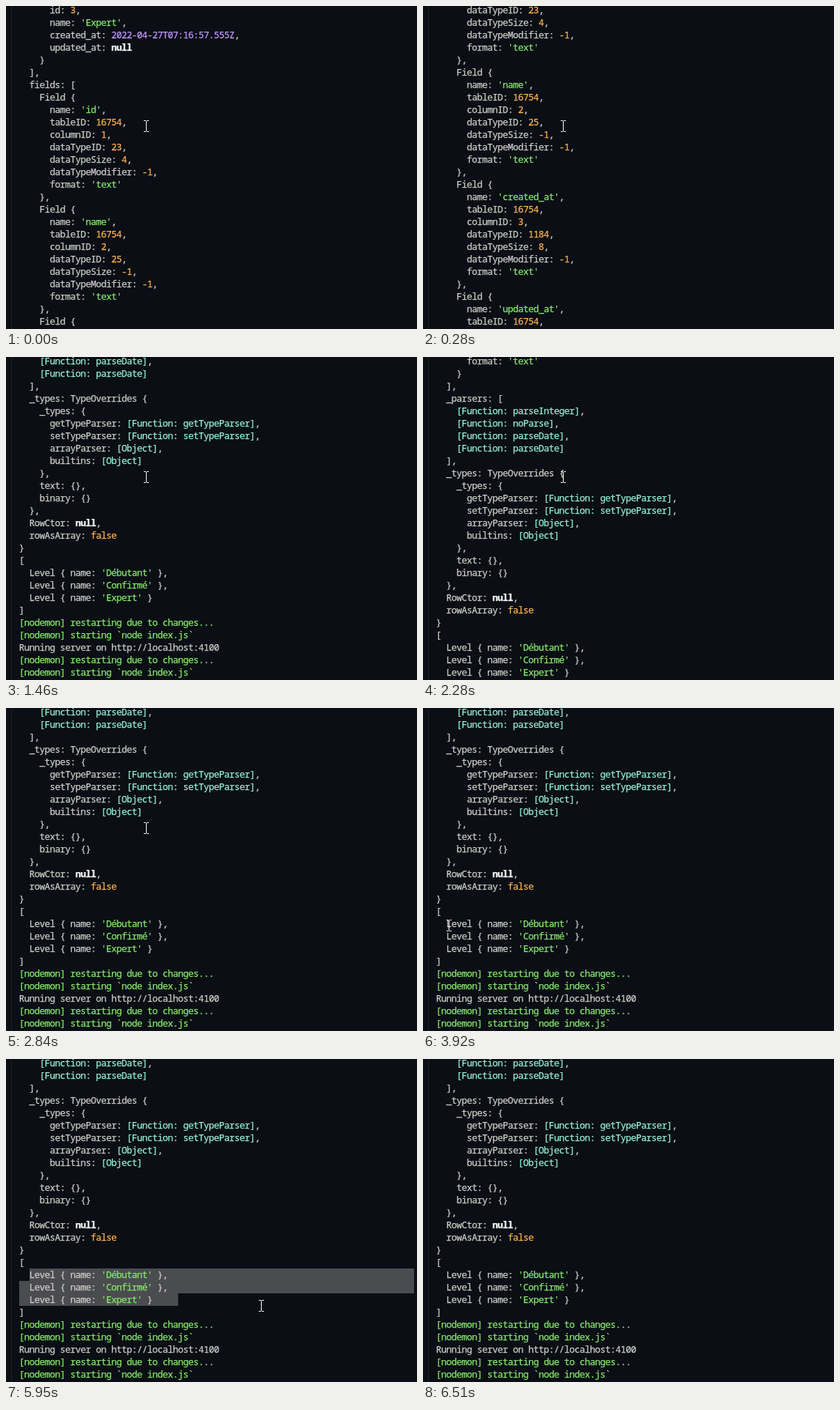
These frames come from a looping animation (561 px wide and 441 px high, 7.23 s). An HTML page:

```html
<!DOCTYPE html>
<html lang="en">
<head>
<meta charset="utf-8">
<title>Terminal log</title>
<style>
  html, body { margin: 0; width: 100%; height: 100%; overflow: hidden; background: #0b0e14; }
  svg { display: block; width: 561px; height: 441px; }
  text {
    font: 12.5px "Noto Sans Mono", "DejaVu Sans Mono", monospace;
    letter-spacing: -.5px; white-space: pre; color: #d0cfca;
  }
  text, tspan { fill: currentColor; stroke: currentColor; stroke-width: .25px; }
  .str, .log { color: #86ec6c; }
  .num { color: #ffb454; }
  .date { color: #c39bff; }
  .ref { color: #95f2dc; }
  .nil { color: #fff; font-weight: bold; }
</style>
</head>
<body>
<svg viewBox="0 0 561 441">
  <rect width="561" height="441" fill="#0b0e14"/>
  <rect x="7" width="1" height="441" fill="#1b1f27"/>
  <g id="selection" fill="#4b4c50"></g>
  <g id="log"></g>
  <path id="beam" fill="#fff" d="M0 0h3v1h-3zM4 0h3v1h-3zM3 1h1v14h-1zM0 15h3v1h-3zM4 15h3v1h-3z"/>
</svg>
<script>
const LOOP = 7230, ROW = 17, COL = 7, LEFT = 18, RIGHT = 557, TOP = -3;
const $ = id => document.getElementById(id);

function make(parent, tag, attrs, content = "") {
  const el = document.createElementNS("http://www.w3.org/2000/svg", tag);
  for (const key in attrs) el.setAttribute(key, attrs[key]);
  el.textContent = content;
  return parent.appendChild(el);
}

const field = (name, column, type, size, end = ",") => `    Field {
      name: '${name}',
      tableID: 16754,
      columnID: ${column},
      dataTypeID: ${type},
      dataTypeSize: ${size},
      dataTypeModifier: -1,
      format: 'text'
    }${end}`;

const restart = "[nodemon] restarting due to changes...\n[nodemon] starting `node index.js`";

const lines = `      id: 3,
      name: 'Expert',
      created_at: 2022-04-27T07:16:57.555Z,
      updated_at: null
    }
  ],
  fields: [
${field("id", 1, 23, 4)}
${field("name", 2, 25, -1)}
${field("created_at", 3, 1184, 8)}
${field("updated_at", 4, 1184, 8, "")}
  ],
  _parsers: [
    [Function: parseInteger],
    [Function: noParse],
    [Function: parseDate],
    [Function: parseDate]
  ],
  _types: TypeOverrides {
    _types: {
      getTypeParser: [Function: getTypeParser],
      setTypeParser: [Function: setTypeParser],
      arrayParser: [Object],
      builtins: [Object]
    },
    text: {},
    binary: {}
  },
  RowCtor: null,
  rowAsArray: false
}
[
  Level { name: 'Débutant' },
  Level { name: 'Confirmé' },
  Level { name: 'Expert' }
]
${restart}
Running server on http://localhost:4100
${restart}`.split("\n");

const token = /(?<log>^\[nodemon\].*)|(?<str>'[^']*')|(?<date>\d{4}-\d\d-\S+Z)|(?<ref>\[(?:Function: \w+|Object)\])|(?<nil>\bnull\b)|(?<num>\bfalse\b|(?<=: )-?\d+)/g;

lines.forEach((line, i) => {
  const body = line.trimStart();
  const x = LEFT + COL * (line.length - body.length) - 0.25;
  const text = make($("log"), "text", { x, y: TOP + 13 + i * ROW });
  let at = 0;
  for (const m of body.matchAll(token)) {
    text.append(body.slice(at, m.index));
    const kind = Object.keys(m.groups).find(k => m.groups[k]);
    make(text, "tspan", { class: kind }, m[0]);
    at = m.index + m[0].length;
  }
  text.append(body.slice(at));
});

// Wheel notches: each one scrolls 5.88 lines.
const wheelDown = [130, 280, 410, 660, 1070, 1210, 1340, 1460, 2840];
const wheelUp = [2280];

function scrollTop(t) {
  const passed = times => times.filter(time => time <= t).length;
  return Math.floor(5.88 * (passed(wheelDown) - passed(wheelUp)));
}

// The pointer is sampled in ticks; each stroke rounds one corner.
const tickAt = t => Math.floor((t - 3090) / 138.3);
const strokes = [
  { start: -0.5, ticks: 5, from: [188, 156], corner: [180, 301], to: [32, 289] },
  { start: 7, ticks: 5, from: [32, 289], corner: [233, 289], to: [233, 329] },
  { start: 22, ticks: 3, from: [345, 329], corner: [342, 340], to: [320, 445] }
];

function pointerAt(tick) {
  // The pointer rests at a stroke's first point before moving.
  const { start, ticks, from, corner, to } = strokes.findLast(s => tick > s.start - 3) || strokes[0];
  const u = Math.min(1, Math.max(0, (tick - start) / ticks));
  const s = 1 - (1 - u) ** 1.6;
  return from.map((a, i) =>
    Math.round(a * (1 - s) ** 3 + corner[i] * 3 * s * (1 - s) + to[i] * s ** 3));
}

const pointerShown = t => t < 5060 || (t >= 5950 && t < 6510);

const FIRST_ROW = 17, DRAG_START = 8, DRAG_END = 12, CLEARED = 6250;
const bars = [0, 1, 2].map(i => make($("selection"), "rect", {
  x: i ? LEFT : LEFT + 2 * COL, y: TOP + (FIRST_ROW + i) * ROW, height: ROW
}));

function drawSelection(t) {
  const tick = tickAt(t);
  const active = tick >= DRAG_START && t < CLEARED;
  const [x, y] = pointerAt(Math.min(tick, DRAG_END));
  const endRow = Math.floor((y + 6.5 - TOP) / ROW) - FIRST_ROW;
  const endX = LEFT + COL * Math.floor((x + 3.5 - LEFT) / COL);
  bars.forEach((bar, i) => {
    const end = i < endRow ? RIGHT : endX;
    bar.setAttribute("width", active && i <= endRow ? end - bar.getAttribute("x") : 0);
  });
}

function draw(t) {
  $("log").setAttribute("transform", `translate(0 ${-scrollTop(t) * ROW})`);
  $("beam").setAttribute("transform", `translate(${pointerAt(tickAt(t))})`);
  $("beam").setAttribute("visibility", pointerShown(t) ? "visible" : "hidden");
  drawSelection(t);
}

const start = performance.now();
function tick() {
  draw((performance.now() - start) % LOOP);
  requestAnimationFrame(tick);
}
draw(0);
requestAnimationFrame(tick);
</script>
</body>
</html>
```
